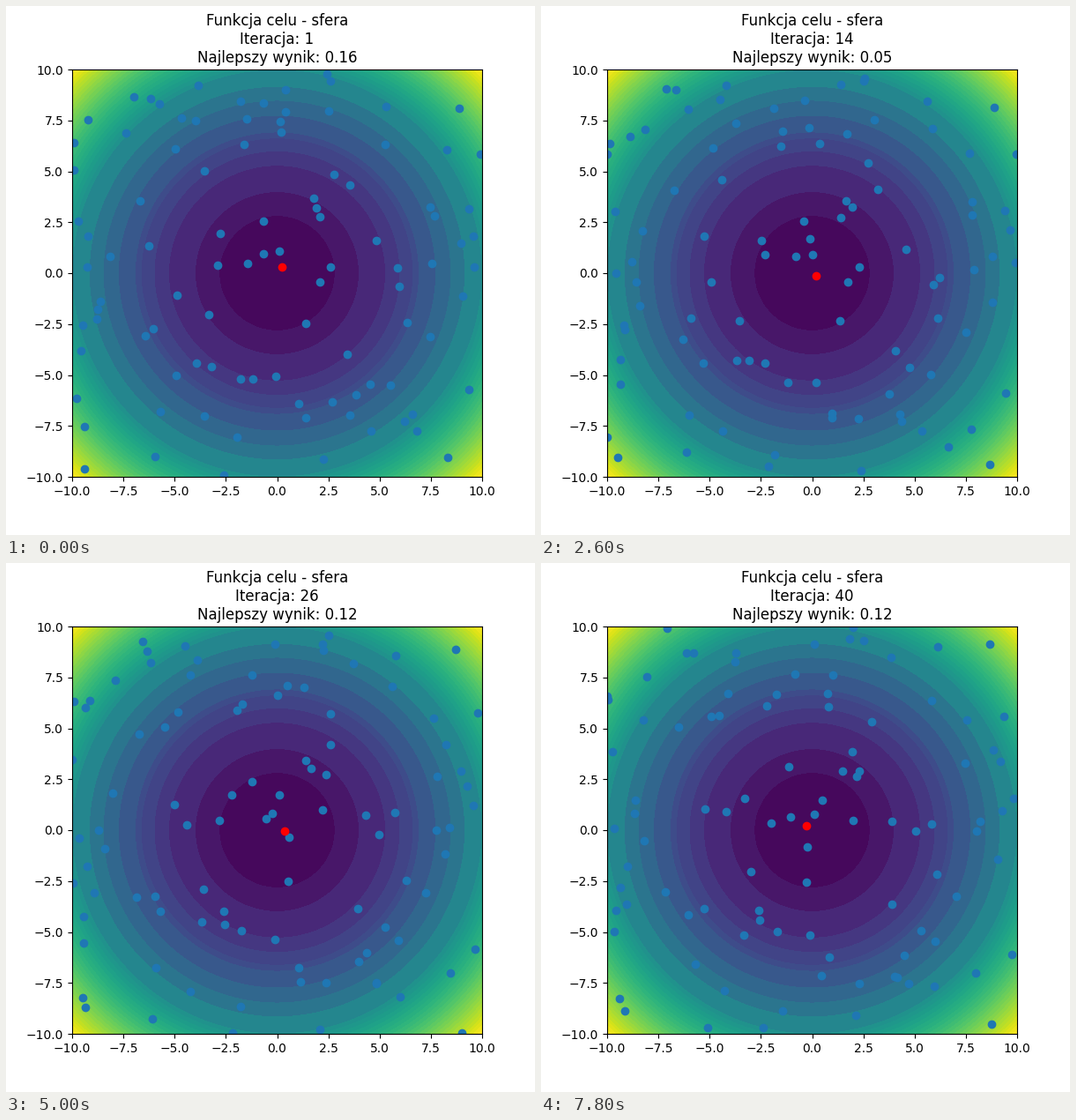
Animation, 600 px wide and 600 px high, one loop 8 s. Source, as a matplotlib script:

```python
import numpy as np
import matplotlib.pyplot as plt
from matplotlib.animation import FuncAnimation

FRAMES, INTERVAL = 40, 200
COUNT, LIMIT, STEP, GAP = 99, 10, 0.2, 0.6

# Waypoints of the best particle: frame index, x, y
BEST_T = [0, 5, 13, 20, 25, 32, 39]
BEST_X = [0.25, 0.35, 0.19, 0.2, 0.35, -0.05, -0.28]
BEST_Y = [0.31, 0.37, -0.13, -0.23, -0.03, 0.16, 0.2]

# Wide bands in the middle, fine ones in the corners
LEVELS = [0, 8, 16, 28, 36, 44, 48, 60, 72, 84, *range(100, 201, 4)]


def sphere(x, y):
    return x**2 + y**2


def confine(pos):
    """Keep particles on the board and farther out than the best one."""
    r = np.hypot(*pos.T)[:, None]
    return np.clip(pos * np.maximum(1, GAP / r), -LIMIT, LIMIT)


def swarm_walk(rng):
    """Uniform random start, then one small random step per iteration."""
    path = [confine(rng.uniform(-LIMIT, LIMIT, (COUNT, 2)))]
    for _ in range(FRAMES - 1):
        path.append(confine(path[-1] + rng.uniform(-STEP, STEP, (COUNT, 2))))
    return np.array(path)


def bridge(rng, keys):
    """Random walk pinned to the waypoint values."""
    t = np.arange(FRAMES)
    walk = np.cumsum(rng.uniform(-STEP / 2, STEP / 2, FRAMES))
    return walk + np.interp(t, BEST_T, np.array(keys) - walk[BEST_T])


rng = np.random.default_rng(7)
swarm = swarm_walk(rng)
best = np.column_stack([bridge(rng, BEST_X), bridge(rng, BEST_Y)])

fig, ax = plt.subplots(figsize=(6, 6), dpi=100)
grid = np.linspace(-LIMIT, LIMIT, 201)
gx, gy = np.meshgrid(grid, grid)
ax.contourf(gx, gy, sphere(gx, gy), levels=LEVELS, cmap="viridis")
ax.set_xlim(-LIMIT, LIMIT)
ax.set_ylim(-LIMIT, LIMIT)

dots = ax.scatter(*swarm[0].T, color="C0", zorder=2)
red = ax.scatter(*best[:1].T, color="red", zorder=3)
title = ax.set_title("")


def update(i):
    dots.set_offsets(swarm[i])
    red.set_offsets(best[i:i + 1])
    title.set_text("Funkcja celu - sfera\n"
                   f"Iteracja: {i + 1}\n"
                   f"Najlepszy wynik: {sphere(*best[i]):.2f}")
    return dots, red, title


anim = FuncAnimation(fig, update, frames=FRAMES, interval=INTERVAL,
                     repeat=True, repeat_delay=0)
plt.show()
```
